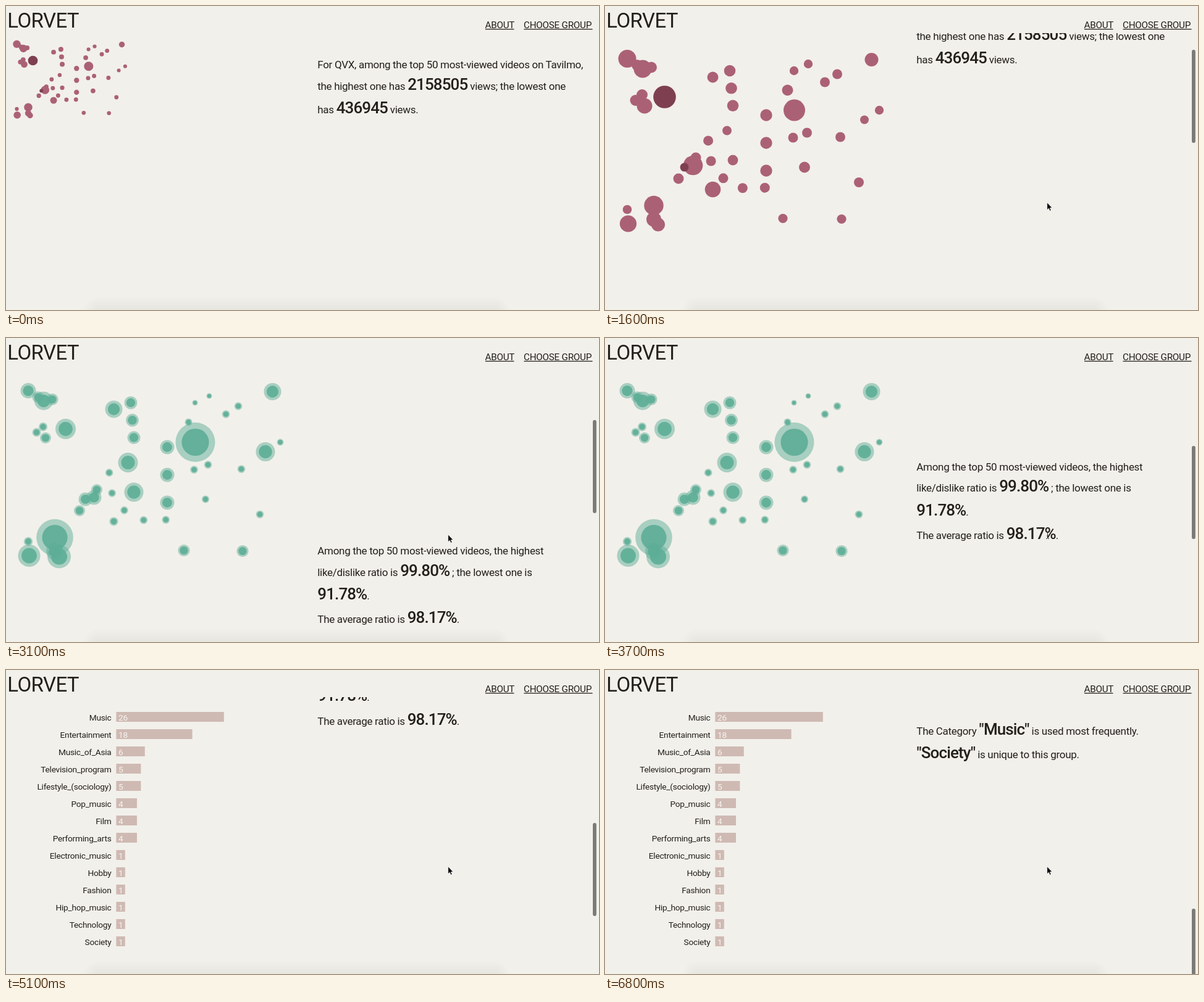
An HTML page for the animation above (7300 ms loop, 960x493 px).

```html
<!DOCTYPE html>
<html lang="en">
<head>
<meta charset="utf-8">
<title>Video statistics</title>
<style>
  html, body { margin: 0; width: 100%; height: 100%; overflow: hidden; background: #f2f0eb; }
  svg { position: fixed; left: 0; top: 0; width: 100%; height: 100%; overflow: hidden; }
  text { font: 17px Roboto, sans-serif; letter-spacing: -.018em; fill: #231f1b; }
  .big { font-size: 26px; font-weight: 500; letter-spacing: -.035em; }
  .title { font-size: 33px; }
  .nav { font-size: 15.3px; }
  .label { font-size: 13.7px; text-anchor: end; }
  .value { font-size: 13.7px; fill: #f7f4f0; }
</style>
</head>
<body>
<svg viewBox="0 0 960 493">
  <g id="views"></g>
  <g id="likes" fill="#5fae97"></g>
  <g id="topics"></g>
  <g id="story"></g>
  <g id="header"><rect width="960" height="44" fill="#f2f0eb"/></g>
  <rect id="thumb" x="950" width="5.8" height="151" rx="2.9" fill="#7b7a77"/>
  <g id="dock" fill-opacity=".009"></g>
  <path id="arrow" d="M0 0V11.8L2.7 9.4L4.5 13.5L6.5 12.6L4.7 8.7H8.2Z" stroke="#fff" stroke-width=".7"/>
  <path id="beam" d="M714 313.5q2.5 0 2.5 2q0-2 2.5-2M716.5 315v9M714 325.5q2.5 0 2.5-2q0 2 2.5 2M715 321h3" fill="none" stroke="#333"/>
</svg>
<script>
const LOOP = 7300, STEP = 100;
const POINTER = { x: 715.7, y: 318.8 };
const GROW = [.1, .43, .74, .93, 1];
const CHARTS = [["views", -100, 2000], ["likes", 2000, 4700], ["topics", 4700, LOOP]];
// start, duration, distance
const SCROLLS = [
  [1200, 400, 81], [1700, 800, 131], [2800, 800, 187], [3600, 800, 157],
  [4400, 800, 114], [5200, 800, 114], [6000, 800, 323]
];
const TOPICS = {
  Music: 26, Entertainment: 18, Music_of_Asia: 6, Television_program: 5,
  "Lifestyle_(sociology)": 5, Pop_music: 4, Film: 4, Performing_arts: 4,
  Electronic_music: 1, Hobby: 1, Fashion: 1, Hip_hop_music: 1, Technology: 1, Society: 1
};

const $ = id => document.getElementById(id);

function add(parent, tag, attrs, content = "") {
  const node = document.createElementNS("http://www.w3.org/2000/svg", tag);
  for (const key in attrs) node.setAttribute(key, attrs[key]);
  node.textContent = content;
  parent.append(node);
  return node;
}

const addText = (id, x, y, content, style = "") =>
  add($(id), "text", { x, y, class: style }, content);

// Dots: evenly spaced runs, one arc, and the prominent ones
const dots = [];
const dot = (x, y, views = 8, likes = 6.3) => dots.push({ x, y, views, likes });

function run(x, y, dx, dy, count, views, likes) {
  for (let i = 0; i < count; i++) dot(x + dx * i, y + dy * i, views, likes);
}

function arc(cx, cy, radius, from, turn, count) {
  for (let i = 0; i < count; i++) {
    const angle = (from + turn * i) * Math.PI / 180, r = radius + 1.8 * i;
    dot(cx + r * Math.cos(angle), cy + r * Math.sin(angle));
  }
}

run(202, 105, 2.5, 28.3, 3, 9.3, 10.5);
run(261, 177, 0, 45, 3, 9.7, 11.5);
run(288, 344.5, 95, 1, 2, 7.6, 9.6);
run(52, 96, 23, 3.5, 2, 9, 9.5);
run(49.5, 153, 10.5, -9, 2, 9, 7);
run(119, 280, 28, -34, 2, 8.5, 9);
run(381, 212.5, 30, 73.5, 2);
run(306, 105, 23, -11, 2, 7.2, 4.5);
run(356, 123.5, 20, -13, 2);
run(304.5, 213.5, 22.5, -8, 2);
run(295.5, 136.5, 27.5, 125, 2, 9, 6);
arc(236, 222, 69, 183, -27.6, 5);
[
  [444, 169, 7.2, 5.4], [420, 184.5, 7, 15.5], [431.5, 87, 11, 14], [306.5, 169, 17.5, 32],
  [36, 85.5, 14.5, 12.5], [61, 102, 14.5, 15], [64, 162, 12.5, 9], [96.5, 147.5, 18.3, 16.5],
  [174.5, 115.5, 9, 14], [197.5, 202, 7.5, 16], [207, 250, 8.4, 15.5], [174.5, 297.5, 12.8, 7],
  [142.5, 258.5, 15.8, 12], [128.5, 261.5, 6.9, 11], [36, 330, 7.3, 7.2], [37.5, 353, 13.6, 18],
  [79, 323.5, 15.7, 29.8], [79, 346, 12, 14], [86, 354.5, 11, 19]
].forEach(values => dot(...values));

// The most and the least viewed dots are dark
const viewSizes = dots.map(d => d.views);
const extremes = [Math.min(...viewSizes), Math.max(...viewSizes)];

for (const { x: cx, y: cy, views, likes } of dots) {
  add($("views"), "circle", { cx, cy, r: views, fill: extremes.includes(views) ? "#7e4051" : "#ab6175" });
  add($("likes"), "circle", { cx, cy, r: likes, "fill-opacity": .5 });
  add($("likes"), "circle", { cx, cy, r: likes * .69, "fill-opacity": .93 });
}

Object.entries(TOPICS).forEach(([name, count], i) => {
  const y = 68 + 28 * i;
  add($("topics"), "rect", { x: 178.4, y, width: 8 + 6.4 * count, height: 16, fill: "#cfbab3" });
  addText("topics", 170.5, y + 13.7, name, "label");
  addText("topics", 182, y + 13.7, count, "value");
});

// Text between asterisks is large and pushes the following line down
const lines = [];
function paragraph(y, ...rows) {
  for (const row of rows) {
    const node = addText("story", 504.3, y, "");
    row.split("*").forEach((part, i) => add(node, "tspan", { class: i % 2 ? "big" : "" }, part));
    lines.push({ node, y });
    y += row.includes("*") ? 38.2 : 34.5;
  }
}

paragraph(101,
  "For QVX, among the top 50 most-viewed videos on Tavilmo,",
  "the highest one has *2158505* views; the lowest one",
  "has *436945* views.");
paragraph(633.5,
  "Among the top 50 most-viewed videos, the highest",
  "like/dislike ratio is *99.80%* ; the lowest one is",
  "*91.78%*.",
  "The average ratio is *98.17%*.");
paragraph(1211.5,
  "The Category *\"Music\"* is used most frequently.",
  "*\"Society\"* is unique to this group.");

addText("header", 2.3, 35, "LORVET", "title");
addText("header", 775.5, 35.5, "ABOUT", "nav");
addText("header", 838, 35.5, "CHOOSE GROUP", "nav");
add($("header"), "path", { d: "M776 37.6H822.5M838.5 37.6H949.5", stroke: "#231f1b", "stroke-width": 1.2 });

for (let inset = 0; inset <= 16; inset += 4) {
  add($("dock"), "rect", { x: 125 + inset, y: 473 + inset, width: 690 - 2 * inset, height: 60, rx: 24 - inset });
}

const scrollAt = time => SCROLLS.reduce((sum, [start, duration, distance]) =>
  sum + distance * Math.min(1, Math.max(0, (time - start) / duration)), 0);

const show = (id, visible) => { $(id).style.display = visible ? "" : "none"; };

function isOverText(scroll) {
  return lines.some(({ node, y }) => {
    const below = y - scroll - POINTER.y;
    return below > -5 && below < 16 && 504 + node.getComputedTextLength() > POINTER.x;
  });
}

function draw(time) {
  const scroll = scrollAt(time);
  for (const [id, start, end] of CHARTS) {
    const age = Math.max(0, time - start) / STEP;
    const scale = GROW[Math.min(GROW.length - 1, age)];
    show(id, time >= start && time < end);
    $(id).setAttribute("transform", `translate(3.5 44) scale(${scale}) translate(-3.5 -44)`);
  }
  $("story").setAttribute("transform", `translate(0 ${-scroll})`);
  $("thumb").setAttribute("y", 46 + .308 * scroll);
  show("thumb", scroll > 0);

  const overText = isOverText(scroll);
  show("arrow", time >= 700 && !overText);
  show("beam", time >= 700 && overText);
  $("arrow").setAttribute("transform", `translate(${POINTER.x} ${time < 800 ? 238 : POINTER.y})`);
}

function tick() {
  draw(Math.floor(performance.now() % LOOP / STEP) * STEP);
  requestAnimationFrame(tick);
}
tick();
</script>
</body>
</html>
```
